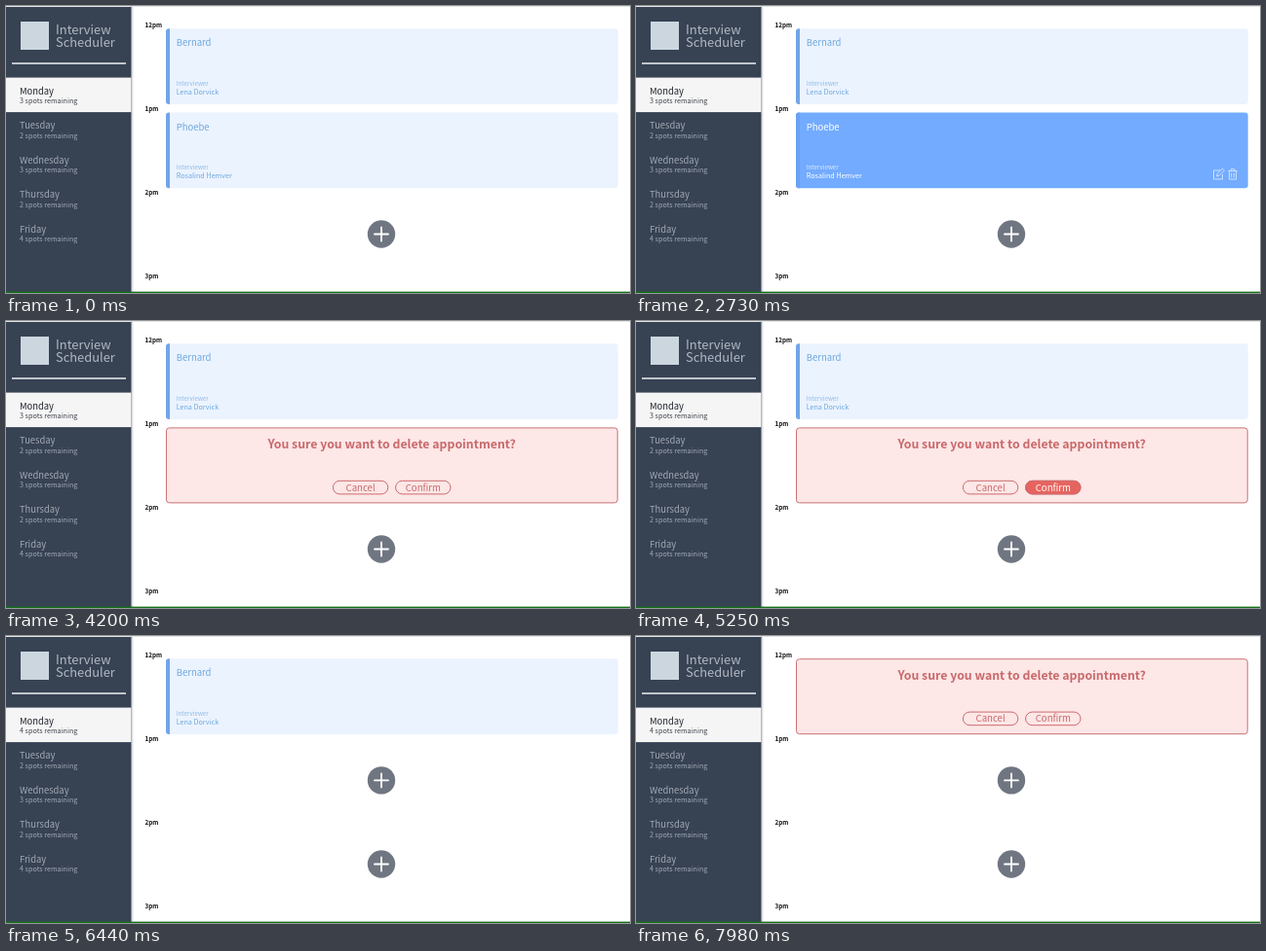
Write an HTML page that moves like this. It is 640 px wide and 295 px high and loops after 8 s.

```html
<!DOCTYPE html>
<html lang="en">
<head>
<meta charset="utf-8">
<title>Interview Scheduler</title>
<style>
  html, body { margin: 0; width: 100%; height: 100%; overflow: hidden; background: #fff; }
  svg { display: block; width: 100%; height: 100%;
    font-family: "Noto Sans CJK JP", "Noto Sans CJK SC", "Noto Sans CJK", "Noto Sans", sans-serif; }
  .brand { font-size: 12.9px; font-weight: 300; fill: #b1b8c2; }
  .day { font-size: 9.4px; }
  .spots { font-size: 7.2px; font-weight: 300; }
  .time { font-size: 6.3px; font-weight: 700; fill: #111; }
  .student { font-size: 9.5px; }
  .label { font-size: 6.2px; font-weight: 300; opacity: .75; }
  .interviewer { font-size: 7.2px; font-weight: 500; }
  .question { font-size: 12.3px; font-weight: 700; fill: #c9696b; }
  .button { font-size: 9.6px; }
  .middle { text-anchor: middle; }
  .timed { animation: 8s step-end infinite; }
</style>
</head>
<body>
<svg id="stage" viewBox="0 0 640 295" preserveAspectRatio="none"></svg>
<script>
const LOOP = 8000;
const rules = [];

const text = (x, y, cls, content, fill) =>
  `<text x="${x}" y="${y}" class="${cls}"${fill ? ` fill="${fill}"` : ''}>${content}</text>`;

// Shows content only between two moments of the loop.
function during(from, to, content) {
  const name = `show-${from}-${to}`;
  const percent = ms => `${ms / LOOP * 100}%`;
  rules.push(`@keyframes ${name} {
    0% { visibility: hidden }
    ${percent(from)} { visibility: visible }
    ${percent(to)} { visibility: hidden }
  }`);
  return `<g class="timed" style="animation-name:${name}">${content}</g>`;
}

const at = (y, content) => `<g transform="translate(0 ${y})">${content}</g>`;

const details = (student, interviewer, fill) =>
  text(174.7, 18, 'student', student, fill) +
  text(174.7, 58.8, 'label', 'Interviewer', fill) +
  text(174.7, 67.6, 'interviewer', interviewer, fill);

const card = (student, interviewer) => `
  <rect x="164" width="463.7" height="77.7" rx="3.2" fill="#ebf3ff"/>
  <path d="M168 0H167.2Q164 0 164 3.2V74.5Q164 77.7 167.2 77.7H168Z" fill="#70a5e8"/>
  ${details(student, interviewer, '#6fa8dc')}`;

const hoveredCard = (student, interviewer) => `
  <rect x="164" width="463.7" height="77.7" rx="3.2" fill="#72abff"/>
  <path d="M168 0H167.2Q164 0 164 3.2V74.5Q164 77.7 167.2 77.7H168Z" fill="#69a1f4"/>
  ${details(student, interviewer, '#fff')}
  <g fill="none" stroke="#d9e8ff" stroke-width=".9" stroke-linejoin="round">
    <path d="M599 59.5H592.5V68.5H601.5V63.5M595.5 65.5L596.2 62.7L601.4 57.6L603.4 59.6L598.2 64.8Z"/>
    <path d="M607.3 60H616.7M610.2 60V58.2H613.8V60M608.4 60V68.6H615.6V60M610.7 62V66.7M613.3 62V66.7"/>
  </g>`;

const button = (x, label, fill, color) => `
  <rect x="${x}" y="54.8" width="56.4" height="13.6" rx="6.8" fill="${fill}" stroke="#cc6a6c"/>
  ${text(x + 28.2, 65.1, 'button middle', label, color)}`;

const confirmButton = hovered => hovered
  ? button(399.6, 'Confirm', '#e66460', '#fff')
  : button(399.6, 'Confirm', '#fde7e7', '#c9696b');

const dialog = `
  <rect x="164.5" y=".4" width="462.7" height="77" rx="3" fill="#fde7e7" stroke="#c97375"/>
  ${text(395.6, 21.8, 'question middle', 'You sure you want to delete appointment?')}
  ${button(335.4, 'Cancel', '#fde7e7', '#c9696b')}
  ${confirmButton(false)}`;

const addButton = y => `
  <circle cx="385" cy="${y}" r="14.2" fill="#707681"/>
  <path d="M378 ${y}H392M385 ${y - 7}V${y + 7}" stroke="#fff" stroke-width="1.8" stroke-linecap="round"/>`;

const days = [['Monday', 0], ['Tuesday', 2], ['Wednesday', 3], ['Thursday', 2], ['Friday', 4]];
const spots = (n, y, fill) => text(14, y, 'spots', `${n} spots remaining`, fill);

const sidebar = `
  <rect x="128" width="3" height="294" fill="url(#edge)"/>
  <rect y="1" width="128.4" height="293" fill="#374253"/>
  <rect x="15" y="16" width="29" height="29" fill="#cbd6df"/>
  ${text(51, 28.8, 'brand', 'Interview')}
  ${text(51, 42, 'brand', 'Scheduler')}
  <path d="M6 59H123" stroke="#eef0f2" stroke-width="1.4"/>
  <rect y="73.6" width="128.4" height="35.5" fill="#f5f5f5"/>
  ${days.map(([day, free], i) => {
    const y = 90.7 + 35.5 * i;
    const fill = i ? '#a2a9b4' : '#20252d';
    return text(14, y, 'day', day, fill) + (i
      ? spots(free, y + 9.7, fill)
      : during(0, 5950, spots(3, y + 9.7, '#3e434b')) +
        during(5950, LOOP, spots(4, y + 9.7, '#3e434b')));
  }).join('')}`;

const times = ['12pm', '1pm', '2pm', '3pm']
  .map((label, i) => text(142.6, 21.8 + 86.2 * i, 'time', label)).join('');

const first = ['Bernard', 'Lena Dorvick'];
const second = ['Phoebe', 'Rosalind Hemver'];

const schedule =
  at(23.3,
    during(0, 7140, card(...first)) +
    during(7140, 7910, hoveredCard(...first)) +
    during(7910, LOOP, dialog)) +
  at(109.5,
    during(0, 2730, card(...second)) +
    during(2730, 3710, hoveredCard(...second)) +
    during(3710, 5950, dialog) +
    during(4760, 5950, confirmButton(true))) +
  during(5950, LOOP, addButton(148.4)) +
  addButton(234.5);

document.getElementById('stage').innerHTML = `
  <defs><linearGradient id="edge">
    <stop stop-color="#b9bdc3"/><stop offset="1" stop-color="#fff"/>
  </linearGradient></defs>
  <rect width="640" height="295" fill="#fff"/>
  <rect width="640" height="1" fill="#e6e6e6"/>
  ${sidebar}${times}${schedule}
  <rect y="293.6" width="640" height="1.4" fill="#147018"/>`;

const sheet = document.createElement('style');
sheet.textContent = rules.join('\n');
document.head.append(sheet);
</script>
</body>
</html>
```
